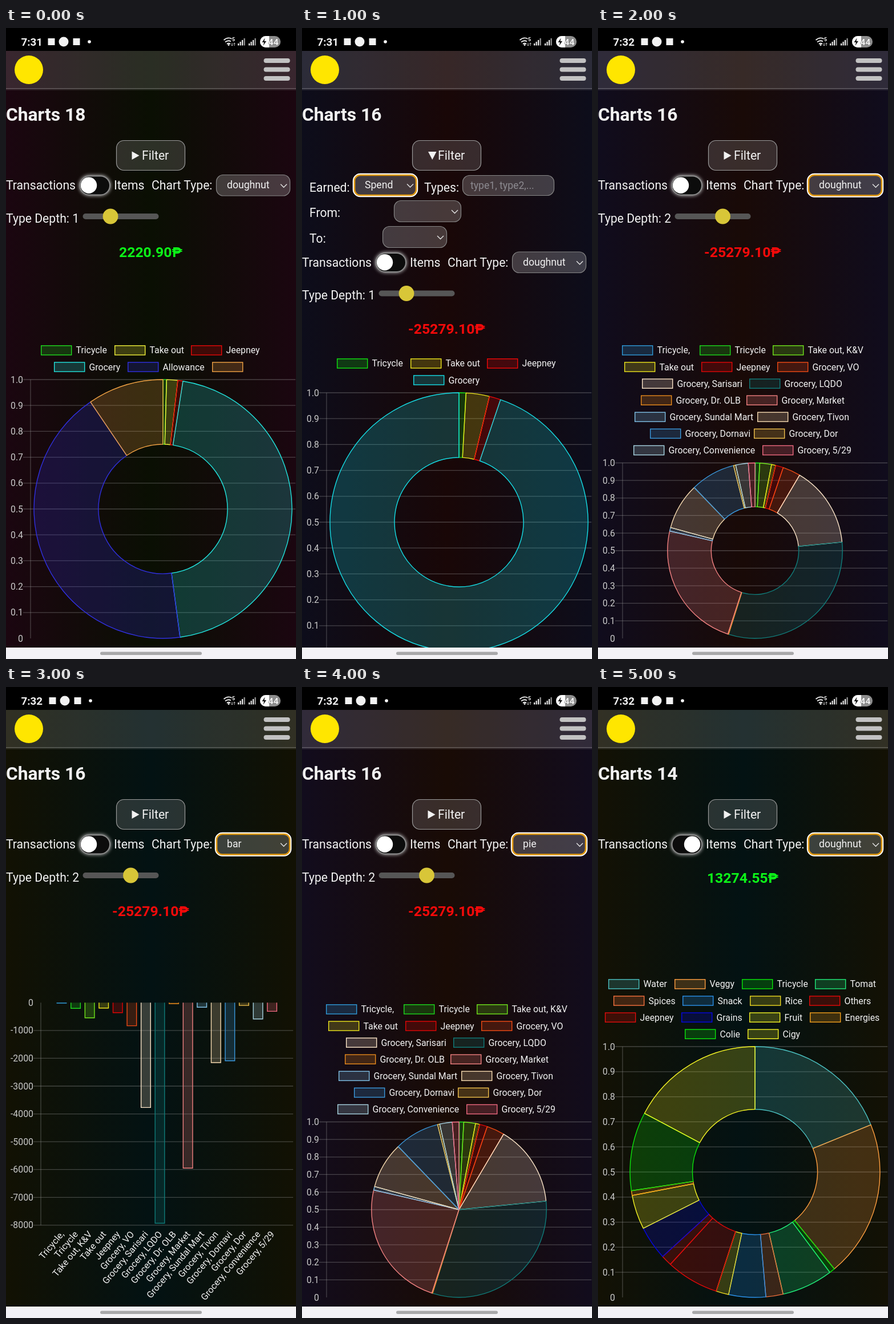
An HTML page that plays this animation: 508 by 1102 pixels, repeating every 6000 ms.

```html
<!DOCTYPE html>
<html lang="en">
<head>
<meta charset="utf-8">
<title>Charts</title>
<style>
html, body { margin: 0; width: 100%; height: 100%; overflow: hidden; background: #000; }
svg { display: block; width: 100vw; height: 100vh; }
text { font-family: Roboto, "Noto Sans", sans-serif; fill: #f2f2f2; white-space: pre; }
.ui { font-size: 21.17px; }
.field { font-size: 17.64px; }
.chart { font-size: 15.87px; }
.axis { fill: #cacaca; }
.h1 { font-size: 31.75px; font-weight: 700; }
.total { font-size: 24.77px; font-weight: 700; text-anchor: middle; }
.end { text-anchor: end; }
.grid { stroke: #a0a0a0; stroke-opacity: .36; stroke-width: 1.3; fill: none; }
.glow { filter: drop-shadow(0 0 3px #ccc); }
</style>
</head>
<body>
<svg id="stage" viewBox="0 0 508 1102" xmlns="http://www.w3.org/2000/svg"></svg>
<script>
const STEP = 1000, BOTTOM = 1066;

// ---------- small helpers ----------
const text = (x, y, s, cls, extra = '') =>
  `<text x="${x}" y="${y}" class="${cls}" ${extra}>${s.replace(/&/g, '&amp;')}</text>`;
const rect = (x, y, w, h, r, fill, extra = '') =>
  `<rect x="${x}" y="${y}" width="${w}" height="${h}" rx="${r}" fill="${fill}" ${extra}/>`;
const circle = (x, y, r, fill) => `<circle cx="${x}" cy="${y}" r="${r}" fill="${fill}"/>`;
const path = (d, extra) => `<path d="${d}" ${extra}/>`;
const tint = c => `fill="${c}" fill-opacity=".21" stroke="${c}" stroke-width="1.4"`;

// ---------- data: label, colour, value ----------
const income = [
  ['Tricycle', '#1fdc1f', 1.6], ['Take out', '#f0f03a', 5], ['Jeepney', '#e60808', 2.3],
  ['Grocery', '#22e2dc', 163.5], ['Allowance', '#3030e0', 153.4], ['', '#f0a244', 34.2]
];
const spend = [
  ['Tricycle', '#10e010', 220], ['Take out', '#ece41c', 740], ['Jeepney', '#f00808', 360],
  ['Grocery', '#16dce4', 23980]
];
const detail = [
  ['Tricycle,', '#2f9ad8', 15], ['Tricycle', '#1cd81c', 205], ['Take out, K&V', '#70e41c', 545],
  ['Take out', '#ece41c', 195], ['Jeepney', '#e00505', 360], ['Grocery, VO', '#f04a14', 830],
  ['Grocery, Sarisari', '#fbe4c8', 3770], ['Grocery, LQDO', '#107c7a', 7930],
  ['Grocery, Dr. OLB', '#e88a1c', 35], ['Grocery, Market', '#f08080', 5950],
  ['Grocery, Sundal Mart', '#80c0e6', 165], ['Grocery, Tivon', '#f6dab0', 2155],
  ['Grocery, Dornavi', '#3a98dc', 2090], ['Grocery, Dor', '#f0c04c', 100],
  ['Grocery, Convenience', '#a8d4e2', 585], ['Grocery, 5/29', '#f06a80', 310]
];
const items = [
  ['Water', '#4bc0c0', 67.9], ['Veggy', '#ff9f40', 72.7], ['Tricycle', '#08e408', 2.6],
  ['Tomat', '#20e878', 23.8], ['Spices', '#f4703c', 8], ['Snack', '#2a90e8', 17.2],
  ['Rice', '#ecd820', 5.9], ['Others', '#e40808', 24.5], ['Jeepney', '#e00c0c', 5],
  ['Grains', '#0606e0', 15.7], ['Fruit', '#f4f424', 15.9], ['Energies', '#f4a01c', 2.2],
  ['Colie', '#0ce40c', 36.5], ['Cigy', '#f4f424', 62.1]
];
const detailRows = [[42, 178, 306], [46, 181, 314], [77, 265], [75, 260], [64, 279], [91, 273], [62, 288]];

// ---------- chart parts ----------
function legend(data, rows, top) {
  let i = 0;
  return rows.map((row, n) => row.map(x => {
    const [label, color] = data[i++], y = top + n * 29.1;
    return rect(x + .7, y - 8.2, 53, 16.2, 0, color, tint(color)) + text(x + 61.5, y + 5.4, label, 'chart');
  }).join('')).join('');
}

function ring(data, cy, R, r) {
  const cx = 275, sum = data.reduce((s, d) => s + d[2], 0);
  const at = (a, rad) => `${(cx + rad * Math.sin(a)).toFixed(2)} ${(cy - rad * Math.cos(a)).toFixed(2)}`;
  let a = 0;
  return data.map(([, color, value]) => {
    const b = a + value / sum * Math.PI * 2, big = b - a > Math.PI ? 1 : 0;
    const inner = r ? `L${at(b, r)}A${r} ${r} 0 ${big} 0 ${at(a, r)}` : `L${cx} ${cy}`;
    const d = `M${at(a, R)}A${R} ${R} 0 ${big} 1 ${at(b, R)}${inner}Z`;
    a = b;
    return path(d, tint(color) + ' stroke-linejoin="bevel"');
  }).join('');
}

function unitAxis(top, bottom) {
  let out = path(`M43 ${top}V${bottom}`, 'class="grid"');
  for (let i = 0; i <= 10; i++) {
    const y = bottom - (bottom - top) * i / 10;
    if (i) out += path(`M30 ${y}H507`, 'class="grid"');
    out += text(30, y + 5.6, i ? (i / 10).toFixed(1) : '0', 'chart axis end');
  }
  return out;
}

function round(data, rows, legendY, top, height, hole) {
  const R = height / 2;
  return legend(data, rows, legendY) + unitAxis(top, top + height) + ring(data, top + R, R, R * hole);
}

function bars(data) {
  const zero = 551.3, unit = 48.57;
  let out = path(`M61 ${zero}V940`, 'class="grid"');
  for (let i = 0; i <= 8; i++) {
    const y = zero + unit * i;
    if (i) out += path(`M48 ${y}H503`, 'class="grid"');
    out += text(48, y + 5.6, i ? `-${i}000` : '0', 'chart axis end');
  }
  data.forEach(([label, color, value], i) => {
    const x = 97.5 + 24.57 * i, h = value / 1000 * unit;
    out += path(`M${x - 8.3} ${zero}v${h}h16.6v${-h}`, tint(color));
    out += text(x, 952, label, 'chart end', `dy=".4em" transform="rotate(-50 ${x} 952)"`);
  });
  return out;
}

// ---------- page parts ----------
const chevron = (x, y) =>
  path(`M${x} ${y}l5.5 5.5l5.5 -5.5`, 'fill="none" stroke="#e4e4e4" stroke-width="1.4"');

function field(x, y, w, h, label, focus) {
  const box = focus
    ? rect(x - 1, y - 1, w + 2, h + 2, 12, '#fff', 'fill-opacity=".2" stroke="#fff" stroke-width="2.4"') +
      rect(x + 1, y + 1, w - 2, h - 2, 10, 'none', 'stroke="#e39a10" stroke-width="2.6"')
    : rect(x + .5, y + .5, w - 1, h - 1, 12, '#fff', 'fill-opacity=".2" stroke="#858585" stroke-width="1.2"');
  return box + text(x + 19, y + 24, label, 'field') + chevron(x + w - 17, y + h / 2 - 2);
}

function filterButton(open) {
  const arrow = open ? 'M221 216h14.5l-7.2 14z' : 'M220.500 215.500v14.500l13 -7.200z';
  return rect(193.5, 196.5, 120, 52, 13, '#fff', 'fill-opacity=".14" stroke="#9a9a9a" stroke-width="1.2"') +
    path(arrow, 'fill="#f2f2f2"') + text(238, 230, 'Filter', 'ui');
}

const filterForm = () =>
  text(13, 285.5, 'Earned:', 'ui') + field(91, 256, 110, 37, 'Spend', true) +
  text(214, 285.5, 'Types:', 'ui') +
  rect(281.5, 257.5, 160, 35, 12, '#fff', 'fill-opacity=".2" stroke="#858585" stroke-width="1.2"') +
  text(295, 280.5, 'type1, type2,...', 'field', 'style="fill:#8c8a90"') +
  text(13, 330, 'From:', 'ui') + field(161, 301, 118, 38, '') +
  text(13, 374.5, 'To:', 'ui') + field(141, 346, 113, 38, '');

function controls(y, type, focus, on) {
  return text(0, y + 7.5, 'Transactions', 'ui') +
    rect(129.500, y - 16, 52.500, 33, 16.500, '#0c0c0c', 'stroke="#8a8a8a" stroke-width="2" class="glow"') +
    circle(on ? 165 : 145, y + .3, 14.2, '#fff') +
    text(189, y + 7.5, 'Items', 'ui') + text(255, y + 7.5, 'Chart Type:', 'ui') +
    field(368, y - 18.5, 130, 37.500, type, focus);
}

const depthRow = (y, depth) =>
  text(0, y + 7.5, `Type Depth: ${depth}`, 'ui') +
  rect(134.5, y - 8, 133, 10, 5, '#565656') + circle(depth === 1 ? 183 : 218.5, y - 3, 13.4, '#d8c638');

function statusBar(time) {
  const dx = time === '7:32' ? 2 : 0;
  let out = rect(0, 0, 508, 40, 0, '#000') +
    text(26.5, 30.5, time, '', 'font-size="18.8" font-weight="700"') +
    rect(73.5 + dx, 18, 12, 12, 0, '#f2f2f2') + circle(101 + dx, 24, 8.5, '#f2f2f2') +
    rect(117.5 + dx, 18, 12, 12, 0, '#f2f2f2') + circle(146 + dx, 24, 2.8, '#fff');
  const line = 'fill="none" stroke="#eee" stroke-width="1.8"';
  out += path('M381.5 21q7.500 -6 14 -2M384 24.500q5 -4 10 -1M387 28q3 -2.500 6 0', line) + circle(390, 29.5, 1.5, '#eee') +
    text(396, 23, '5', '', 'font-size="9" font-weight="700"') +
    path('M396 26v5m-1.500 -1.500l1.500 1.500l1.500 -1.500M400 31v-5m-1.500 1.500l1.500 -1.500l1.500 1.500', 'fill="none" stroke="#ccc" stroke-width="1"');
  for (const x of [406, 425])
    for (let i = 0; i < 4; i++)
      out += rect(x + i * 3.5, 27 - i * 3, 2.2, 3.5 + i * 3, 0, i < 3 ? '#eee' : '#999');
  return out + rect(445, 14, 36, 20, 10, '#8e8e8e') +
    path('M461 14h-6a10 10 0 0 0 0 20h6z', 'fill="#fff"') +
    path('M453.500 17.500l-5 7.500h3.500l-1.500 6l5.500 -8h-3.500z', 'fill="#111"') +
    text(459.5, 29.5, '44', '', 'font-size="15.5" font-weight="700" style="paint-order:stroke;stroke:#777;stroke-width:1px"');
}

function header() {
  let out = rect(0, 40, 508, 66, 0, '#fff', 'fill-opacity=".13"') +
    rect(0, 105, 508, 2, 0, '#fff', 'fill-opacity=".22"') +
    rect(0, 107, 508, 2, 0, '#fff', 'fill-opacity=".08"') + circle(40, 73, 25, '#ffe600');
  for (const y of [53, 68.5, 84]) out += rect(451.5, y, 46, 8, 4, '#c2c2c2');
  return out;
}

const navBar = () => rect(0, 1082, 508, 20, 0, '#f3f2f6') + rect(165, 1089.5, 178, 5.500, 2.750, '#a8a8aa');

// ---------- scenes ----------
const GREEN = '#0cf618', RED = '#f60a0a';
const donut = (data, rows, legendY, top, height = BOTTOM - top) => round(data, rows, legendY, top, height, .5);
const scenes = [
  { time: '7:31', count: 18, edge: '#1b0610', mid: '#0a0f03', type: 'doughnut', depth: 1,
    total: '2220.90', chart: donut(income, [[61, 190, 324], [84, 213, 361]], 563, 614) },
  { time: '7:31', count: 16, edge: '#0d0d1b', mid: '#190707', type: 'doughnut', depth: 1, open: true,
    total: '-25279.10', chart: donut(spend, [[61, 190, 324], [195]], 586, 637, 452) },
  { time: '7:32', count: 16, edge: '#100c1d', mid: '#190a07', type: 'doughnut', depth: 2, focus: true,
    total: '-25279.10', chart: donut(detail, detailRows, 563, 759.5) },
  { time: '7:32', count: 16, edge: '#121103', mid: '#031213', type: 'bar', depth: 2, focus: true,
    total: '-25279.10', chart: bars(detail) },
  { time: '7:32', count: 16, edge: '#120c1d', mid: '#190b05', type: 'pie', depth: 2, focus: true,
    total: '-25279.10', chart: round(detail, detailRows, 563, 759.5, BOTTOM - 759.5, 0) },
  { time: '7:32', count: 14, edge: '#131104', mid: '#031213', type: 'doughnut', on: true, focus: true,
    total: '13274.55', chart: donut(items, [[18, 134, 252, 380], [27, 148, 266, 370], [12, 146, 265, 371], [152, 262]], 519, 628) }
];

function draw(s, i) {
  const y = s.open ? 409 : 274.5, totalY = s.depth ? y + 125 : y + 67;
  const color = s.total[0] === '-' ? RED : GREEN;
  return `<g display="none"><linearGradient id="bg${i}"><stop stop-color="${s.edge}"/>` +
    `<stop offset=".5" stop-color="${s.mid}"/><stop offset="1" stop-color="${s.edge}"/></linearGradient>` +
    rect(0, 0, 508, 1102, 0, `url(#bg${i})`) + statusBar(s.time) + header() +
    text(0, 161.5, `Charts ${s.count}`, 'h1') + filterButton(s.open) + (s.open ? filterForm() : '') +
    controls(y, s.type, s.focus, s.on) + (s.depth ? depthRow(y + 57.5, s.depth) : '') +
    text(253.5, totalY, s.total + '₱', 'total', `style="fill:${color}"`) + s.chart + navBar() + '</g>';
}

const stage = document.getElementById('stage');
stage.innerHTML = scenes.map(draw).join('');
const groups = [...stage.children];
const start = performance.now();
let shown = -1;

function tick(now) {
  const n = Math.floor(Math.max(0, now - start) / STEP) % scenes.length;
  if (n !== shown) {
    groups.forEach((g, i) => g.setAttribute('display', i === n ? 'inline' : 'none'));
    shown = n;
  }
  requestAnimationFrame(tick);
}
tick(start);
</script>
</body>
</html>
```
